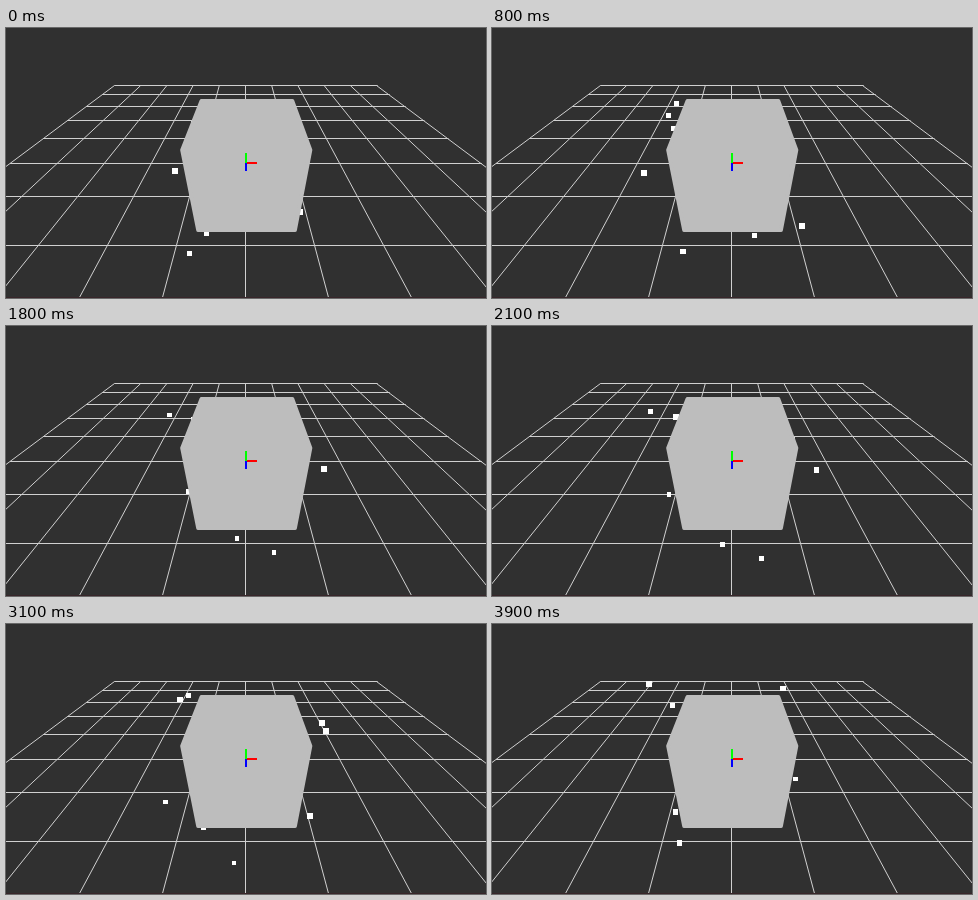
Animation, 480 px wide and 270 px high, one loop 4 s. Source, as an HTML page:

```html
<!DOCTYPE html>
<html lang="en">
<head>
<meta charset="utf-8">
<title>Particles around a block</title>
<style>
  html, body { margin: 0; width: 100%; height: 100%; overflow: hidden; background: #303030; }
  svg { display: block; width: 480px; height: 270px; }
</style>
</head>
<body>
<svg viewBox="0 0 480 270">
  <rect width="480" height="270" fill="#303030"/>
  <path id="grid" fill="none" stroke="#d0d0d0"/>
  <rect y="269" width="480" height="1" fill="#38262a"/>
  <g id="dots" fill="#fff" shape-rendering="crispEdges"></g>
  <path d="M195.5 73H286.3L304.3 122L288.9 202H192.2L176.2 122Z"
        fill="#bdbdbd" stroke="#bdbdbd" stroke-width="4" stroke-linejoin="round"/>
  <g shape-rendering="crispEdges">
    <rect x="239" y="134" width="2" height="9" fill="#00f"/>
    <rect x="239" y="125" width="2" height="10" fill="#0f0"/>
    <rect x="241" y="134" width="10" height="2" fill="#f00"/>
  </g>
</svg>
<script>
const LOOP = 4000, STEP = 100;
const CX = 240, CY = 135;

// Floor grid in perspective
const HORIZON = -41, TOP = 57, GAP = 26.2;
const gapAt = y => GAP * (y - HORIZON) / (TOP - HORIZON);
const rowY = k => Math.floor(HORIZON + 1108.3 / (11.295 - k)) + 0.5;
let d = '';
for (let k = 0; k < 8; k++) {
  const y = rowY(k), w = 5 * gapAt(y);
  d += `M${CX - w} ${y}H${CX + w}`;
}
for (let i = -5; i <= 5; i++) {
  const x = CX - 0.5;
  d += `M${x + i * GAP} ${TOP + 0.5}L${x + i * gapAt(270)} 270`;
}
document.getElementById('grid').setAttribute('d', d);

// Bursts leave the centre at a steady rate; all times are in steps
const LIFE = 51, FIRST_END = 7.2, PERIOD = 5.3;
const BASE = 5, NEAR = 6.5, SPREAD = 2.3;

// Angle in degrees and final distance of each particle, nearest to the viewer first
const bursts = [
  [[122, 125]],
  [[173.5, 99], [217, 86.5]],
  [[42, 121], [119, 127], [227, 99.5]],
  [[218, 75], [73, 106]],
  [[6, 102], [211, 111]],
  [[41.7, 91.6], [228, 91], [96.6, 110]],
  [[334.7, 103], [340.7, 101.5], [152, 107]],
  [[222, 128.5], [306, 99], [122, 112], [137, 87], [17.5, 74], [222, 88]]
];

function makeParticle([angle, reach], burst, depth) {
  const el = document.createElementNS('http://www.w3.org/2000/svg', 'rect');
  document.getElementById('dots').append(el);
  const a = angle * Math.PI / 180;
  const end = FIRST_END + PERIOD * burst;
  const growth = (NEAR - SPREAD * depth) / BASE;
  return { el, end, growth, x: reach * Math.cos(a), y: reach * Math.sin(a) };
}

const particles = bursts.flatMap((burst, b) =>
  burst.map((p, i) => makeParticle(p, b, (i + 0.5) / burst.length)));

function place({ el, end, growth, x, y }, step) {
  const age = 1 - (end - step) / LIFE;
  el.style.display = age > 0 && age < 1 ? '' : 'none';
  const scale = 1 / (1 - (1 - 1 / growth) * age);
  const size = BASE * scale, travel = age * scale / growth;
  el.setAttribute('x', CX + x * travel - size / 2);
  el.setAttribute('y', CY + y * travel - size / 2);
  el.setAttribute('width', size);
  el.setAttribute('height', size);
}

function draw(ms) {
  const step = Math.floor(ms % LOOP / STEP);
  particles.forEach(p => place(p, step));
}

const start = performance.now();
function tick() {
  draw(performance.now() - start);
  requestAnimationFrame(tick);
}
tick();
</script>
</body>
</html>
```
